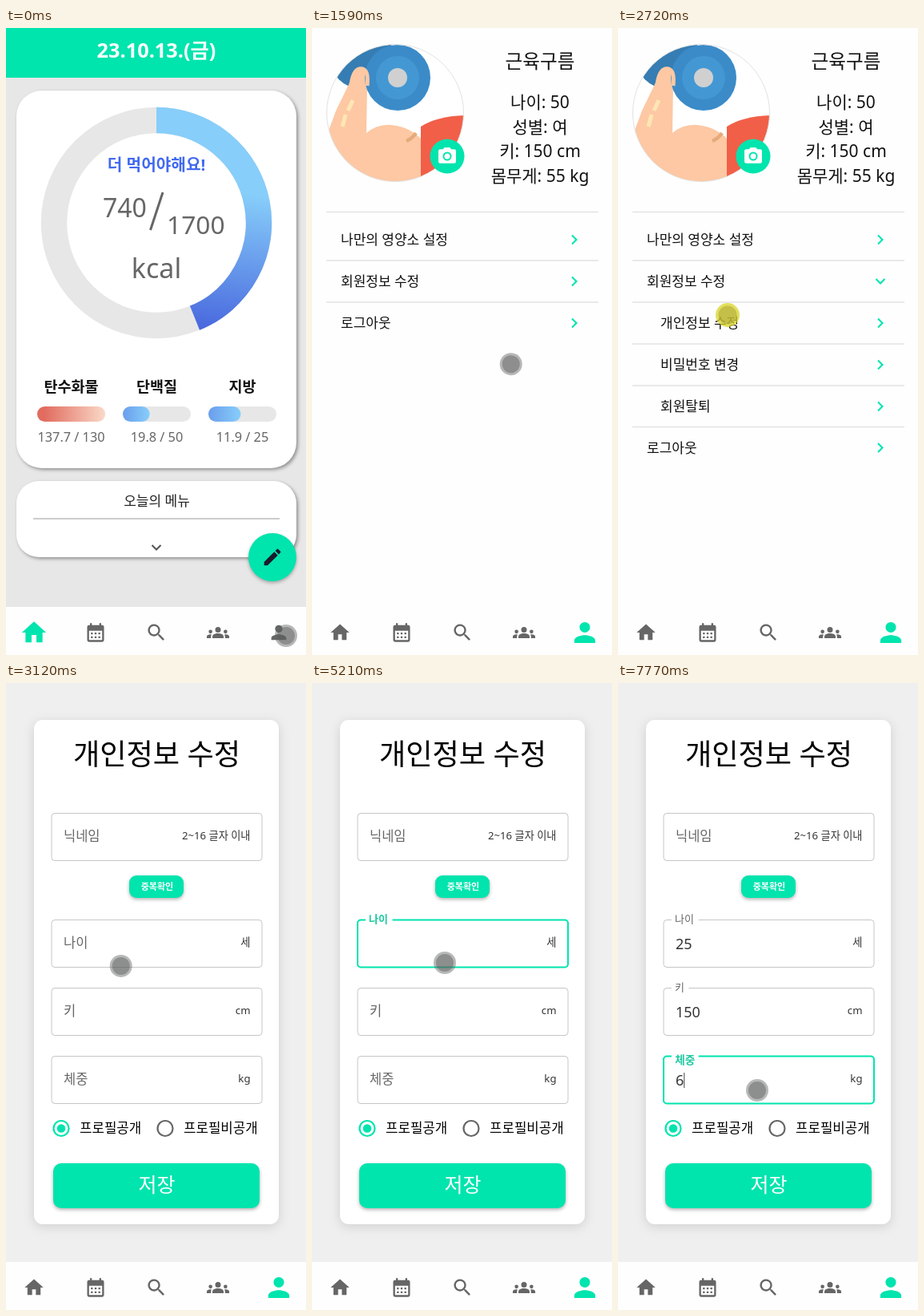
An HTML page for the animation above (8000 ms loop, 375x782 px).

```html
<!DOCTYPE html>
<html lang="ko">
<head>
<meta charset="utf-8">
<title>식단 관리 앱</title>
<style>
  html, body { margin: 0; width: 100%; height: 100%; overflow: hidden; background: #fff; }
  svg { display: block; width: 375px; height: 782px; }
  text { font-family: 'Noto Sans', 'Noto Sans CJK KR', 'Noto Sans CJK JP', sans-serif; white-space: pre; }
  .card { filter: drop-shadow(2px 2px 2px rgba(0,0,0,.38)); }
  .panel { filter: drop-shadow(0 3px 7px rgba(0,0,0,.13)); }
  .raised { filter: drop-shadow(0 2px 2px rgba(0,0,0,.3)); }
</style>
</head>
<body>
<svg viewBox="0 0 375 782">
  <defs>
    <linearGradient id="ring" gradientUnits="userSpaceOnUse" x1="215" y1="195" x2="190" y2="378">
      <stop offset="0" stop-color="#87cefa"/><stop offset="1" stop-color="#4562dc"/>
    </linearGradient>
    <linearGradient id="blue"><stop offset="0" stop-color="#6a9eec"/><stop offset="1" stop-color="#87cefa"/></linearGradient>
    <linearGradient id="red"><stop offset=".1" stop-color="#e16c5f"/><stop offset="1" stop-color="#fad9c8"/></linearGradient>
    <clipPath id="avatar"><circle cx="104" cy="106" r="85.5"/></clipPath>
  </defs>
  <g id="stage"></g>
</svg>
<script>
const LOOP = 8000, STEP = 66.7;
const TEAL = '#00e4ae', GRAY = '#666';

const ICONS = {
  home: 'M10 20v-6h4v6h5v-8h3L12 3 2 12h3v8z',
  calendar: 'M19 4h-1V2h-2v2H8V2H6v2H5a2 2 0 0 0-2 2v14a2 2 0 0 0 2 2h14a2 2 0 0 0 2-2V6a2 2 0 0 0-2-2zm0 16H5V10h14zM9 14H7v-2h2zm4 0h-2v-2h2zm4 0h-2v-2h2zm-8 4H7v-2h2zm4 0h-2v-2h2zm4 0h-2v-2h2z',
  search: 'M15.5 14h-.8l-.3-.3a6.5 6.5 0 1 0-.7.7l.3.3v.8l5 5 1.5-1.5zm-6 0a4.5 4.5 0 1 1 0-9 4.5 4.5 0 0 1 0 9z',
  groups: 'M12 12.8c1.6 0 3 .4 4.2.9a3 3 0 0 1 1.8 2.7V18H6v-1.6a3 3 0 0 1 1.8-2.7c1.1-.5 2.6-.9 4.2-.9zM4 13a2 2 0 1 0 0-4 2 2 0 0 0 0 4zm1.1 1.1A7 7 0 0 0 1.2 14.6 2 2 0 0 0 0 16.4V18h4.5v-1.6c0-.8.2-1.6.6-2.3zM20 13a2 2 0 1 0 0-4 2 2 0 0 0 0 4zm4 3.4a2 2 0 0 0-1.2-1.8 7 7 0 0 0-3.9-.5c.4.7.6 1.5.6 2.3V18H24zM12 6a3 3 0 1 1 0 6 3 3 0 0 1 0-6z',
  person: 'M12 12a4 4 0 1 0 0-8 4 4 0 0 0 0 8zm0 2c-2.7 0-8 1.3-8 4v2h16v-2c0-2.7-5.3-4-8-4z',
  pencil: 'M3 17.25V21h3.75L17.8 9.94l-3.75-3.75zM20.7 7.04a1 1 0 0 0 0-1.41l-2.34-2.34a1 1 0 0 0-1.41 0l-1.83 1.83 3.75 3.75z',
  camera: 'M9 2 7.2 4H4a2 2 0 0 0-2 2v12a2 2 0 0 0 2 2h16a2 2 0 0 0 2-2V6a2 2 0 0 0-2-2h-3.2L15 2zm3 15a5 5 0 1 1 0-10 5 5 0 0 1 0 10zm0-1.8a3.2 3.2 0 1 0 0-6.4 3.2 3.2 0 0 0 0 6.4z'
};

const text = (s, x, y, size, fill = '#111', anchor = 'start', weight = 400) =>
  `<text x="${x}" y="${y}" font-size="${size}" fill="${fill}" text-anchor="${anchor}" font-weight="${weight}">${s}</text>`;
const rect = (x, y, w, h, r, fill, extra = '') =>
  `<rect x="${x}" y="${y}" width="${w}" height="${h}" rx="${r}" fill="${fill}" ${extra}/>`;
const circle = (x, y, r, fill, extra = '') => `<circle cx="${x}" cy="${y}" r="${r}" fill="${fill}" ${extra}/>`;
const path = (d, stroke, width, extra = '') => `<path d="${d}" fill="none" stroke="${stroke}" stroke-width="${width}" ${extra}/>`;
const icon = (name, x, y, scale, fill) =>
  `<path d="${ICONS[name]}" fill="${fill}" transform="translate(${x} ${y}) scale(${scale}) translate(-12 -12)"/>`;
const chevron = (x, y, down, color = TEAL) =>
  path(down ? `M${x - 5.5} ${y - 3}l5.5 5.5 5.5-5.5` : `M${x - 3} ${y - 5.5}l5.5 5.5-5.5 5.5`, color, 2.1);
const rule = (y, x1 = 18, x2 = 358, color = '#e2e2e2') => path(`M${x1} ${y}H${x2}`, color, 1.3);

function nav(active) {
  const places = { home: [35, 754], calendar: [112, 754], search: [188, 754], groups: [265, 754], person: [341, 754] };
  return rect(0, 722, 375, 60, 0, '#fefefe') + Object.entries(places).map(([name, [x, y]]) =>
    name === active ? icon(name, x, y, name === 'home' ? 1.52 : 1.64, TEAL) : icon(name, x, y, 1.17, GRAY)).join('');
}

function nutrient(x, name, value, share, fill) {
  const center = x + 42.5;
  return text(name, center, 454, 18.5, '#111', 'middle', 700) +
    rect(x, 472, 85, 19, 9.5, '#e7e7e7') + rect(x, 472, 85 * share, 19, 9.5, `url(#${fill})`) +
    text(value, center, 516, 16.3, GRAY, 'middle');
}

function homePage() {
  const end = 158 * Math.PI / 180;
  const arc = `M188 115A128 128 0 0 1 ${188 + 128 * Math.sin(end)} ${243 - 128 * Math.cos(end)}`;
  return rect(0, 0, 375, 782, 0, '#e7e7e7') + rect(0, 0, 375, 62, 0, TEAL) +
    text('23.10.13.(금)', 188, 37, 25.3, '#fff', 'middle', 700) +
    rect(13, 78, 350, 471, 32, '#fff', 'class="card"') +
    circle(188, 243, 128, 'none', 'stroke="#e7e7e7" stroke-width="32.5"') + path(arc, 'url(#ring)', 32.5) +
    text('더 먹어야해요!', 188, 178, 20.2, '#4169f0', 'middle', 700) +
    text('740', 121, 236, 32, GRAY) + path('M180.5 252L196 205', GRAY, 3) + text('1700', 201, 257, 31.7, GRAY) +
    text('kcal', 188, 312, 34, GRAY, 'middle') +
    nutrient(39, '탄수화물', '137.7 / 130', 1, 'red') +
    nutrient(146, '단백질', '19.8 / 50', .396, 'blue') +
    nutrient(253, '지방', '11.9 / 25', .476, 'blue') +
    rect(13, 565, 350, 95, 28, '#fff', 'class="card"') +
    text('오늘의 메뉴', 188.5, 596, 17, '#222', 'middle') + rule(612, 34, 342, '#bbb') + chevron(188, 648, true, '#555') +
    circle(333, 660, 30, TEAL, 'class="raised"') + icon('pencil', 333, 660, 1.15, '#1b1b2b') + nav('home');
}

function profileHeader() {
  const arm = 'M12 200V150Q24 120 30 103L48 66Q52 50 63 51Q71 53 69 70L68 131Q82 119 100 121Q124 124 138 140V200z';
  return rect(0, 0, 375, 782, 0, '#fefefe') +
    circle(104, 106, 85.5, '#fff') +
    `<g clip-path="url(#avatar)">` +
    circle(62, 36, 40, '#357db3') +
    `<path d="${arm}" fill="#fdc8a3"/><path d="M136 200V123Q156 110 192 109V200z" fill="#f15f48"/>` +
    circle(107, 62, 41, '#3b8bc8') + circle(107, 62, 27, '#4398d4') + circle(107, 62, 12, '#d0d0d0') +
    path('M49 70Q52 49 63 51Q71 53 69 72', '#fdc8a3', 5) +
    path('M118 141Q125 138 130 131', '#e6ab7a', 4.5) + path('M51 90l-6 13M42 108l-4 15', '#ffe6b4', 5) +
    `</g>` + circle(104, 106, 85.5, 'none', 'stroke="#e2e2e2"') +
    circle(169, 160, 21.5, TEAL) + icon('camera', 169, 160, 1.1, '#fff') +
    text('근육구름', 285, 50, 23.6, '#111', 'middle') +
    ['나이: 50', '성별: 여', '키: 150 cm', '몸무게: 55 kg'].map((s, i) => text(s, 285, 100 + i * 30.7, 21, '#111', 'middle')).join('') +
    rule(229.5) + rule(290) + rule(342) +
    text('나만의 영양소 설정', 36, 270, 17) + chevron(328, 264) + text('회원정보 수정', 36, 322, 17);
}

const HOME = homePage(), PROFILE = profileHeader(), PROFILE_NAV = nav('person');

// Solves a cubic-bezier easing curve for x by bisection.
function bezier(x1, y1, x2, y2) {
  const at = (a, b, u) => 3 * a * u * (1 - u) ** 2 + 3 * b * u * u * (1 - u) + u ** 3;
  return x => {
    if (x <= 0 || x >= 1) return x <= 0 ? 0 : 1;
    let lo = 0, hi = 1;
    for (let i = 0; i < 20; i++) {
      const mid = (lo + hi) / 2;
      if (at(x1, x2, mid) < x) lo = mid; else hi = mid;
    }
    return at(y1, y2, lo);
  };
}
const easeInOut = bezier(.4, 0, .2, 1), easeOut = bezier(0, 0, .2, 1);
const within = (t, spans) => spans.some(([a, b]) => t >= a && t < b);
// Elapsed time since start, advancing in whole video steps.
const stepped = (t, start) => Math.floor((t - start + 2) / STEP) * STEP;

function profilePage(t) {
  const open = t >= 2120;
  const height = open ? 155.5 * easeInOut((stepped(t, 2120) + 82) / 300) : 0;
  const items = ['개인정보 수정', '비밀번호 변경', '회원탈퇴'].map((s, i) =>
    text(s, 53, 374 + i * 52, 17) + chevron(328, 368 + i * 52) + (i < 2 ? rule(394 + i * 52) : '')).join('');
  const ripple = within(t, [[2120, 2250]])
    ? `<path d="M212 342A22.5 22.5 0 1 1 246 342z" fill="#000" opacity=".12"/>` : '';
  return PROFILE + chevron(328, 316, open) + ripple +
    (open ? `<svg x="0" y="342" width="375" height="${height}" viewBox="0 342 375 ${height}">${items}</svg>` + rule(342 + height) : '') +
    text('로그아웃', 36, 374 + height, 17) + chevron(328, 368 + height) + PROFILE_NAV;
}

const FIELDS = [
  { y: 162, label: '닉네임', unit: '2~16 글자 이내' },
  { y: 295, label: '나이', unit: '세', focus: 3720, blur: 6400, typed: [[5340, '2'], [5540, '25']],
    caret: [[3720, 4250], [4680, 5210], [5340, 5940]] },
  { y: 380, label: '키', unit: 'cm', focus: 6400, blur: 7690, typed: [[6540, '1'], [6940, '15'], [7010, '150']],
    caret: [[6400, 7560]] },
  { y: 465, label: '체중', unit: 'kg', focus: 7690, blur: LOOP, typed: [[7770, '6']], caret: [[7690, LOOP]] }
];

function field({ y, label, unit, focus = Infinity, blur, typed = [], caret = [] }, t) {
  const active = t >= focus && t < blur;
  const raise = t >= focus ? easeOut((stepped(t, focus) + 26) / 200) : 0;
  const size = 16.5 - 3.5 * raise, middle = y + 29 - 30 * raise;
  const value = typed.filter(([at]) => t >= at).map(([, s]) => s).pop() || '';
  const caretX = 72.5 + value.length * 10.3;
  return rect(57, y + .5, 263, 59, 4, 'none', `stroke="${active ? TEAL : '#c6c6c6'}" stroke-width="${active ? 2 : 1}"`) +
    (raise > .7 ? rect(67, y - 2, 9 + label.length * 12.3, 5, 0, '#fff') : '') +
    text(label, 72 - raise, middle + size * .36, size, active ? '#1ec9a0' : GRAY, 'start', active ? 700 : 400) +
    text(unit, 305.5, y + 33, 13.2, '#333', 'end') + text(value, 72, y + 36.5, 18, '#333') +
    (within(t, caret) ? path(`M${caretX} ${y + 21}v19`, '#444', 1) : '');
}

const FORM = rect(0, 0, 375, 782, 0, '#efefef') + rect(35, 46, 306, 629, 11, '#fff', 'class="panel"') +
  text('개인정보 수정', 188.5, 102, 36.2, '#000', 'middle') +
  rect(154, 240, 68, 28, 9, TEAL, 'class="raised"') + text('중복확인', 189, 258, 11, '#fff', 'middle', 700) +
  circle(69, 555.5, 9.5, 'none', `stroke="${TEAL}" stroke-width="2.2"`) + circle(69, 555.5, 5.3, TEAL) +
  text('프로필공개', 92, 561, 16.8, '#000') +
  circle(199, 555.5, 9.5, 'none', 'stroke="#666" stroke-width="2.2"') + text('프로필비공개', 222, 561, 16.8, '#000') +
  rect(59, 599, 258, 56, 10, TEAL, 'class="raised"') + text('저장', 188.5, 635, 25, '#fff', 'middle');

const formPage = t => FORM + FIELDS.map(f => field(f, t)).join('') + PROFILE_NAV;

// Pointer stops: time, x, y.
const POINTER = [
  [0, 350, 758], [1060, 336, 760], [1120, 278, 762], [1790, 236, 270], [1860, 233, 268], [2119, 233, 268],
  [2120, 135, 374], [2590, 137, 358], [2983, 137, 358], [3400, 158, 342], [4113, 158, 342], [4250, 166, 349],
  [5873, 166, 349], [6140, 161, 430], [7493, 161, 430], [7560, 174, 508], [LOOP, 174, 508]
];
const PRESSES = [[990, 1060], [2720, 2850], [3590, 3660], [6340, 6400], [7630, 7690]];

function pointer(t) {
  const i = POINTER.findIndex(([at]) => at > t);
  const [t0, x0, y0] = POINTER[i - 1], [t1, x1, y1] = POINTER[i];
  const p = t0 === 0 ? 0 : Math.min(1, stepped(t, t0) / (t1 - t0));
  const x = x0 + (x1 - x0) * p, y = y0 + (y1 - y0) * p;
  return within(t, PRESSES)
    ? circle(x, y, 15, 'rgba(218,212,40,.75)') + circle(x, y, 11.5, 'rgba(165,160,50,.5)')
    : circle(x, y, 14, 'rgba(95,100,98,.45)') + circle(x, y, 11, 'rgba(90,90,90,.45)');
}

const stage = document.getElementById('stage');
let shown = '';
function draw(now) {
  const t = now % LOOP;
  const page = t < 1060 ? HOME : t < 2850 ? profilePage(t) : formPage(t);
  const scene = page + pointer(t);
  if (scene !== shown) stage.innerHTML = shown = scene;
  requestAnimationFrame(draw);
}
draw(0);
</script>
</body>
</html>
```
